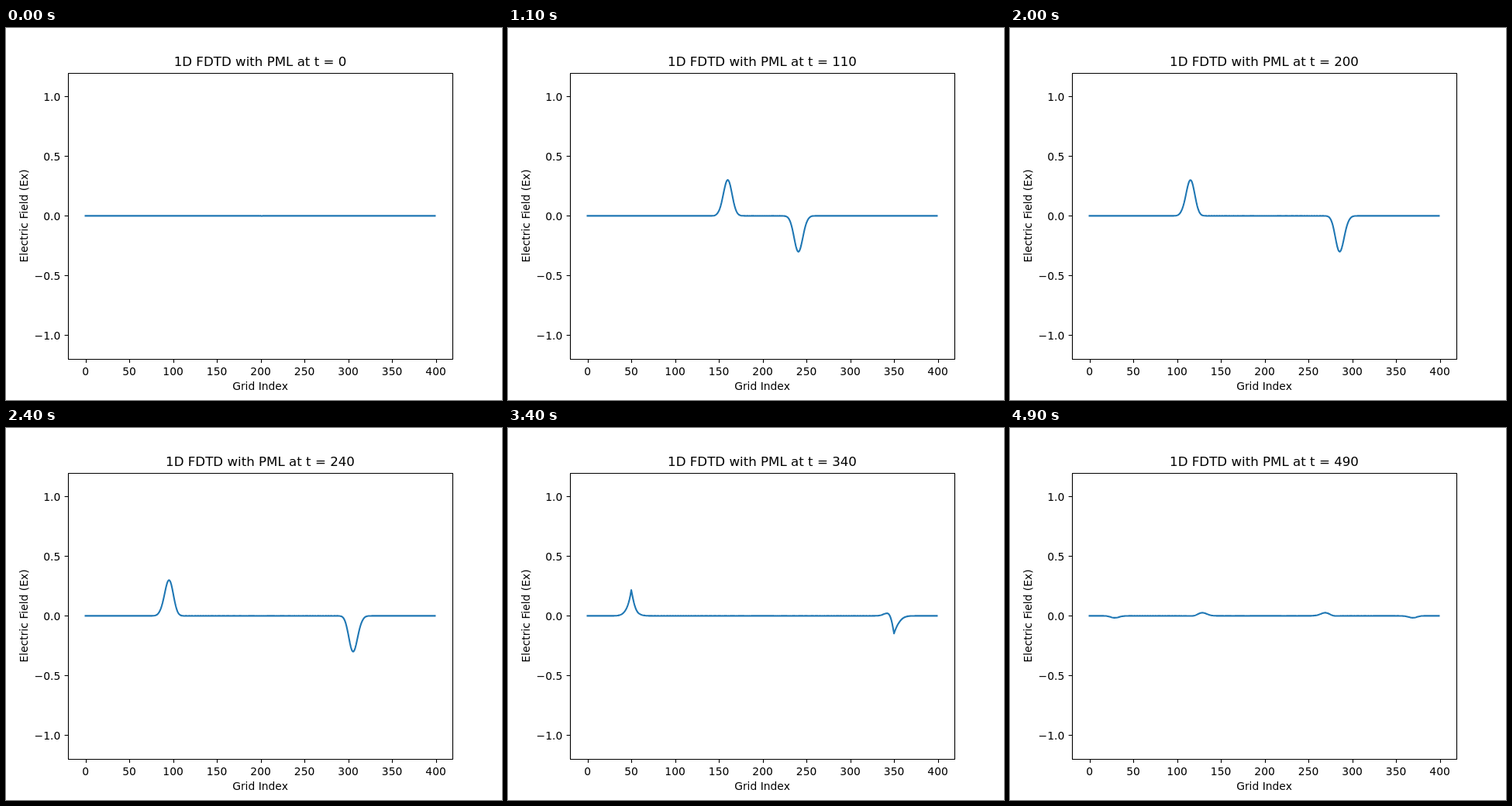
Recreate the animation shown at these times as an HTML page with a canvas. Size 640x480 px, loop 5000 ms.

```html
<!DOCTYPE html>
<html lang="en">
<head>
<meta charset="utf-8">
<title>1D FDTD with PML</title>
<style>
html, body { margin: 0; height: 100%; overflow: hidden; background: #fff; }
canvas { display: block; }
</style>
</head>
<body>
<canvas id="plot" width="640" height="480"></canvas>
<script>
const ctx = document.getElementById('plot').getContext('2d');
const CELLS = 400, LAYER = 50, SOURCE = 200, FRAMES = 50, STEPS = 10, HOLD = 100;
const LEFT = 80, RIGHT = 576, TOP = 57.6, BOTTOM = 427.2;

const span = CELLS - 1;
const px = i => LEFT + (i + span * 0.05) / (span * 1.1) * (RIGHT - LEFT);
const py = v => (TOP + BOTTOM) / 2 - v * (BOTTOM - TOP) / 2.4;
const snap = v => Math.floor(v + 0.5) + 0.5;

// Damping peaks at the inner edge of each layer, so part of the pulse reflects there.
function damping(i) {
  const depth = Math.min(i, span - i);
  return depth < LAYER ? 0.107 * (depth / LAYER) ** 6 : 0;
}

// Runs the field equations and keeps every tenth step.
function simulate() {
  const ex = new Float64Array(CELLS), hy = new Float64Array(CELLS);
  const loss = Array.from(ex, (_, i) => damping(i));
  const advance = (v, curl, x) => ((1 - x) * v + 0.5 * curl) / (1 + x);
  const shots = [];
  for (let t = 0; shots.length < FRAMES; t++) {
    for (let i = 0; i < CELLS - 1; i++) hy[i] = advance(hy[i], ex[i + 1] - ex[i], loss[i]);
    hy[SOURCE] += 0.3 * Math.exp(-0.5 * ((t - 30) / 10) ** 2);
    for (let i = 1; i < CELLS; i++) ex[i] = advance(ex[i], hy[i] - hy[i - 1], loss[i]);
    if (t % STEPS === 0) shots.push(ex.slice());
  }
  return shots;
}

function line(x1, y1, x2, y2) {
  ctx.beginPath();
  ctx.moveTo(x1, y1);
  ctx.lineTo(x2, y2);
  ctx.stroke();
}

function text(str, x, y, align = 'center', size = 13.89) {
  ctx.font = size + 'px "DejaVu Sans", sans-serif';
  ctx.textAlign = align;
  ctx.fillText(str, x, y);
}

function drawAxes() {
  ctx.strokeStyle = ctx.fillStyle = '#000';
  ctx.lineWidth = 1.11;
  ctx.lineCap = 'butt';
  for (let i = 0; i <= 400; i += 50) {
    const x = px(i);
    line(snap(x), BOTTOM, snap(x), BOTTOM + 4.86);
    text(i, x, 448);
  }
  for (let v = -1; v <= 1; v += 0.5) {
    const y = py(v);
    line(LEFT - 4.4, snap(y), LEFT + 0.5, snap(y));
    text(v.toFixed(1).replace('-', '\u2212'), 70.3, Math.round(y + 5.2), 'right');
  }
  ctx.strokeRect(snap(LEFT), snap(TOP), RIGHT - LEFT, snap(BOTTOM) - snap(TOP));
  text('Grid Index', 328, 467);
  ctx.save();
  ctx.translate(28, py(0));
  ctx.rotate(-Math.PI / 2);
  text('Electric Field (Ex)', 0, 0);
  ctx.restore();
}

function drawCurve(field) {
  ctx.strokeStyle = '#1f77b4';
  ctx.lineWidth = 2.08;
  ctx.lineCap = 'square';
  ctx.lineJoin = 'round';
  ctx.beginPath();
  field.forEach((v, i) => ctx.lineTo(px(i), py(v)));
  ctx.stroke();
}

const shots = simulate();

function draw(now) {
  const n = Math.floor(now / HOLD) % FRAMES;
  ctx.fillStyle = '#fff';
  ctx.fillRect(0, 0, 640, 480);
  drawCurve(shots[n]);
  drawAxes();
  text('1D FDTD with PML at t = ' + n * STEPS, 328, 49, 'center', 16.67);
}

let start;
function tick(now) {
  start ??= now;
  draw(now - start);
  requestAnimationFrame(tick);
}
draw(0);
requestAnimationFrame(tick);
</script>
</body>
</html>
```
